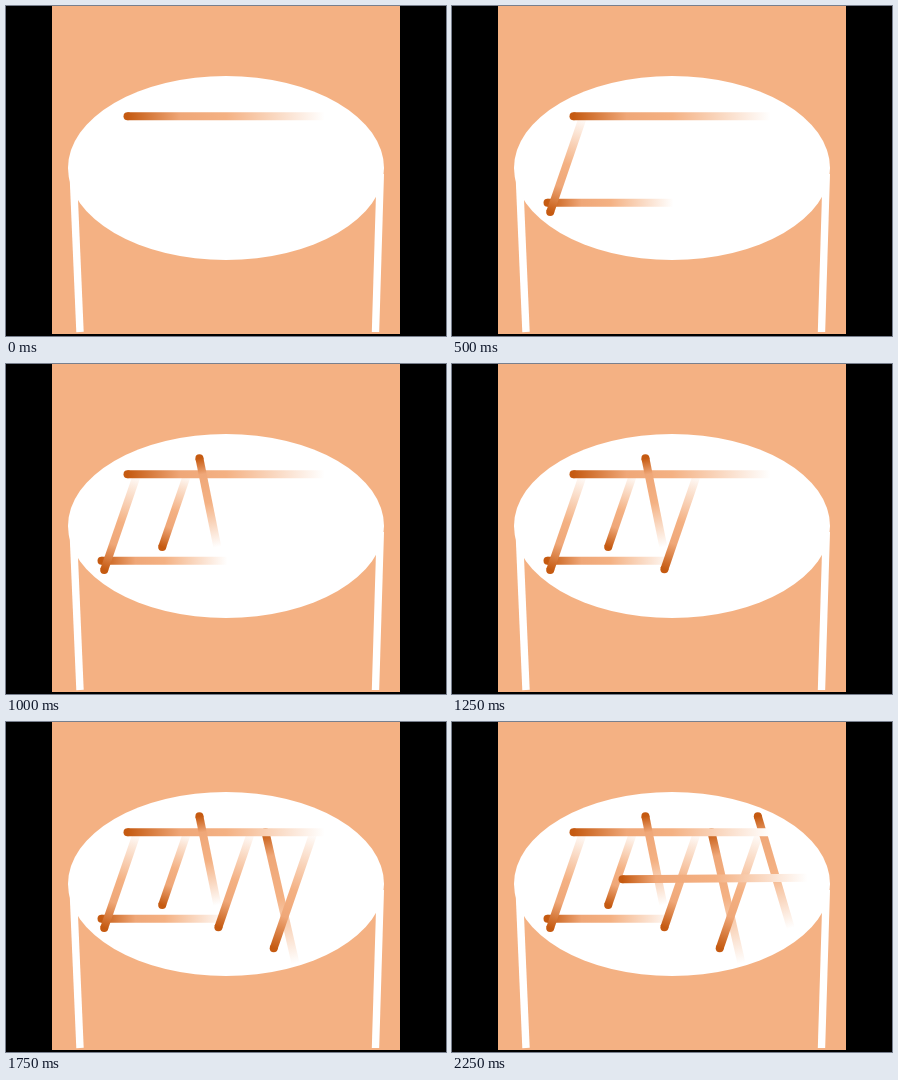
These frames come from a looping animation (440x330 px, 2500 ms). An HTML page:

```html
<!DOCTYPE html>
<html lang="en">
<head>
<meta charset="utf-8">
<title>Sticks on a table</title>
<style>
html, body { margin: 0; width: 100%; height: 100%; overflow: hidden; background: #000; }
svg { display: block; width: 440px; height: 330px; }
</style>
</head>
<body>
<svg viewBox="0 0 440 330">
  <defs id="defs"></defs>
  <rect width="440" height="330" fill="#000"/>
  <rect x="46" width="348" height="328" fill="#f4b183"/>
  <g stroke="#fff" stroke-width="7.4">
    <path d="M67.2 168L74 326"/>
    <path d="M374.3 168L369.5 326"/>
  </g>
  <ellipse cx="220" cy="162" rx="158" ry="92" fill="#fff"/>
  <g id="sticks"></g>
</svg>
<script>
const STEP = 250, COUNT = 10, LOOP = STEP * COUNT;
const DARK = '#c55a11', LIGHT = '#f4b183';
const RAIL_Y = 110.3, LEAN = 0.345, WIDTH = 8;
const NS = 'http://www.w3.org/2000/svg';
const defs = document.getElementById('defs');
const sticks = document.getElementById('sticks');
const start = document.timeline.currentTime || 0;

function add(parent, tag, attrs) {
  const el = document.createElementNS(NS, tag);
  for (const key in attrs) el.setAttribute(key, attrs[key]);
  return parent.appendChild(el);
}

// Round dark head at (x1, y1), fading to white at (x2, y2); lead = length of the dark part
function stick(step, x1, y1, x2, y2, lead = 0.27) {
  const id = 'wood' + step;
  const grad = add(defs, 'linearGradient', { id, x1, y1, x2, y2, gradientUnits: 'userSpaceOnUse' });
  const stop = (offset, color) => add(grad, 'stop', { offset, 'stop-color': color });
  stop(0, DARK);
  stop(lead, '#efa778');
  stop(0.5, LIGHT);
  stop(1, '#fff');

  const g = add(sticks, 'g', {});
  add(g, 'circle', { cx: x1, cy: y1, r: WIDTH / 2, fill: DARK });
  add(g, 'path', { d: `M${x1} ${y1}L${x2} ${y2}`, stroke: `url(#${id})`, 'stroke-width': WIDTH });
  if (step) g.animate([
    { opacity: 0, offset: 0, easing: 'step-end' },
    { opacity: 1, offset: step / COUNT },
    { opacity: 1, offset: 1 }
  ], { duration: LOOP, iterations: Infinity }).startTime = start;
}

const bar = (step, x, y, length) => stick(step, x, y, x + length, y);
const rise = (step, x, y) => stick(step, x, y, x + (y - RAIL_Y) * LEAN, RAIL_Y);
const fall = (step, x, y, dx, dy) => stick(step, x, y, x + dx, y + dy, 0.18);

// Back to front
bar(2, 95.5, 196.7, 126);
rise(1, 98.2, 206);
rise(3, 156.2, 183);
rise(5, 212.4, 205.2);
fall(6, 259.5, RAIL_Y, 30, 131);
rise(7, 267.7, 226.2);
fall(8, 305.8, 94.2, 33, 112);
bar(0, 121.5, RAIL_Y, 197);
fall(4, 193.4, 94.2, 18, 89);
fall(9, 170.5, 157.2, 185, -1.4);
</script>
</body>
</html>
```
